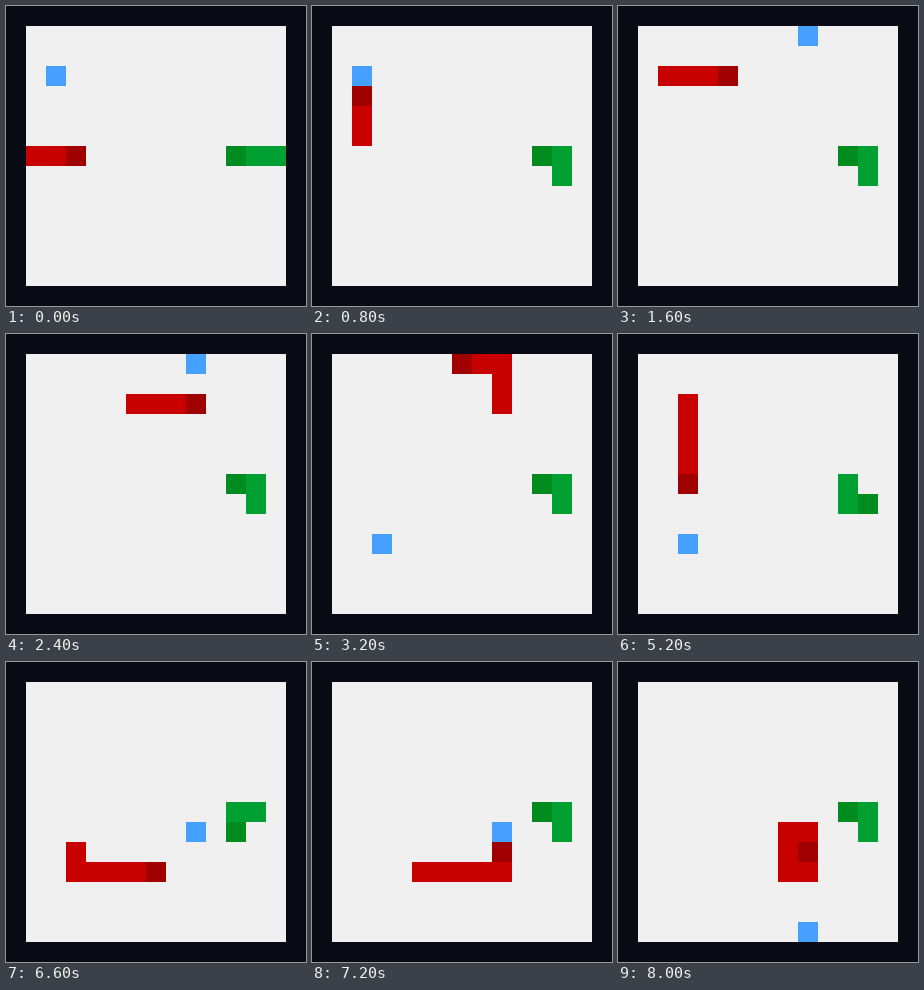
Animation of 300x300 px, one loop 9000 ms. Source, as an HTML page with a canvas:

```html
<!DOCTYPE html>
<html lang="en">
<head>
<meta charset="utf-8">
<title>Two snakes</title>
<style>
  html, body { margin: 0; width: 100%; height: 100%; overflow: hidden; background: #0a0a14; }
  canvas { display: block; }
</style>
</head>
<body>
<canvas id="stage" width="300" height="300"></canvas>
<script>
const ctx = document.getElementById('stage').getContext('2d');
const CELL = 20, TICK = 200, LAST_TICK = 40, LOOP = 9000;
const FOODS = [[1, 2], [8, 0], [2, 9], [8, 7], [8, 12]];

// Bodies are lists of cells, head first.
const startBody = (x, y, trail) => [0, 1, 2].map(i => [x + i * trail, y]);
const heading = ([[hx, hy], [nx, ny]]) => [hx - nx, hy - ny];
const turnLeft = ([dx, dy]) => [dy, -dx];
const ahead = ([x, y], [dx, dy]) => [x + dx, y + dy];

// Chase the food sideways first, then vertically; never reverse.
function steer(body, food) {
  const [dx, dy] = heading(body), [x, y] = body[0];
  const choices = [
    [Math.sign(food[0] - x), 0],
    [0, Math.sign(food[1] - y)],
    turnLeft([dx, dy])
  ];
  return choices.find(([cx, cy]) => (cx || cy) && (cx !== -dx || cy !== -dy));
}

// Play the game up to the given tick: red hunts, green circles.
function play(ticks) {
  let red = startBody(2, 6, -1), green = startBody(10, 6, 1), eaten = 0;
  for (let i = 0; i < ticks; i++) {
    const food = FOODS[eaten];
    const head = ahead(red[0], steer(red, food));
    const ate = head[0] === food[0] && head[1] === food[1];
    red = [head, ...(ate ? red : red.slice(0, -1))];
    if (ate) eaten++;
    green = [ahead(green[0], turnLeft(heading(green))), ...green.slice(0, -1)];
  }
  return { red, green, food: FOODS[eaten] };
}

function fillCell([x, y], color) {
  ctx.fillStyle = color;
  ctx.fillRect((x + 1) * CELL, (y + 1) * CELL, CELL, CELL);
}

function drawSnake([head, ...tail], bodyColor, headColor) {
  for (const cell of tail) fillCell(cell, bodyColor);
  fillCell(head, headColor);
}

function draw(time) {
  const { red, green, food } = play(Math.min(LAST_TICK, Math.floor((time % LOOP) / TICK)));

  ctx.fillStyle = '#0a0a14';
  ctx.fillRect(0, 0, 300, 300);
  ctx.fillStyle = '#f0f0f0';
  ctx.fillRect(20, 20, 260, 260);

  fillCell(food, '#46a0ff');
  drawSnake(green, '#00a032', '#008c1e');
  drawSnake(red, '#c80000', '#a00000');
}

const start = performance.now();
function frame() {
  draw(performance.now() - start);
  requestAnimationFrame(frame);
}
frame();
</script>
</body>
</html>
```
